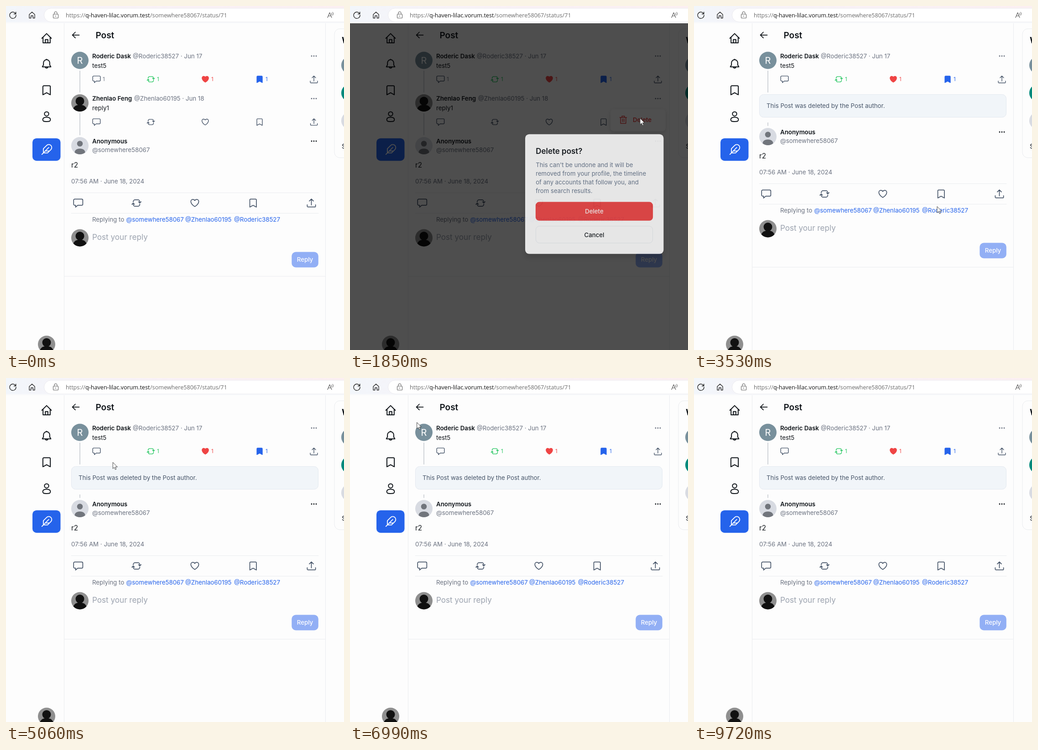
An HTML page that plays this animation: 741x756 px, repeating every 9980 ms.

```html
<!DOCTYPE html>
<html lang="en">
<head>
<meta charset="utf-8">
<title>Delete a post</title>
<style>
  html, body { margin: 0; width: 100%; height: 100%; overflow: hidden; background: #fdfdfd; }
  svg { display: block; font-family: Inter, "Liberation Sans", sans-serif; }
  .url { font-family: "Open Sans", "Noto Sans", sans-serif; }
  #menu > rect { filter: drop-shadow(0 3px 4px #0002); }
  #dialog > rect:first-child { filter: drop-shadow(0 8px 6px #0002); }
</style>
</head>
<body>
<svg id="stage" width="741" height="756" viewBox="0 0 741 756"></svg>
<script>
const LOOP = 9980;
const INK = '#0f1419', GREY = '#6b7280', SLATE = '#475569', BLUE = '#2563eb',
      RED = '#ef4444', GREEN = '#22c55e', LINE = '#eaecef';

// Icon outlines in a 24 x 24 box
const ICONS = {
  reply: 'M4 3h16a2.5 2.5 0 0 1 2.5 2.5v9A2.5 2.5 0 0 1 20 17h-9l-5 4.5V17H4a2.5 2.5 0 0 1-2.5-2.5v-9A2.5 2.5 0 0 1 4 3z',
  repost: 'M4.5 9.5V9a4.2 4.2 0 0 1 4-4.4h7a4.2 4.2 0 0 1 4 4.4v3l3-3m-3 3-3-3M19.5 14.5v.5a4.2 4.2 0 0 1-4 4.4h-7a4.2 4.2 0 0 1-4-4.4v-3l3 3m-3-3-3 3',
  like: 'M21 8.2c0-2.5-2.1-4.5-4.7-4.5-1.9 0-3.6 1.1-4.3 2.7-.7-1.6-2.4-2.7-4.3-2.7C5.1 3.7 3 5.7 3 8.2c0 7.3 9 12 9 12s9-4.7 9-12z',
  save: 'M4.5 5a2 2 0 0 1 2-2h11a2 2 0 0 1 2 2v16.3L12 17.2l-7.5 4.1z',
  share: 'M2.5 16v3.2A1.8 1.8 0 0 0 4.3 21h15.4a1.8 1.8 0 0 0 1.8-1.8V16M7.3 7.5 12 2.8l4.7 4.7M12 3v13.5',
  home: 'M2 12.5 12 2.5l10 10M4.5 10.5V22h15V10.5M9.3 22v-7h5.4v7',
  bell: 'M12 2.5a6.6 6.6 0 0 0-6.6 6.6v4.4L3 17.5h18l-2.4-4V9.1A6.6 6.6 0 0 0 12 2.5zM9.3 18a2.8 2.8 0 0 0 5.4 0M12 1.5v1',
  user: 'M12 1.8a4.5 4.5 0 1 1 0 9 4.5 4.5 0 0 1 0-9zM4 18.5c0-3 3-5 8-5s8 2 8 5c0 3.5-2 4-8 4s-8-.5-8-4z',
  feather: 'M20.2 12.2a6 6 0 0 0-8.5-8.5L5 10.5V19h8.5zM16 8 2 22M17.5 15H9',
  trash: 'M3 6h18M8.5 6V2.5h7V6M5 6v15.5h14V6M10 10v7M14 10v7'
};

const CURSORS = {
  arrow: 'M0 0V13.5L3.2 10.6 5.3 15.5 7.5 14.6 5.4 9.8H9.5z',
  hand: 'M-1.5 1.5C-1.5-.3 1-.3 1 1.5V6.5L6 7.5C7.5 7.9 8 8.8 7.8 10.2L6.8 17.5H-.2C-1.5 15-3 13-4 10.8-4.6 9.5-3.4 8.7-2.6 9.8L-1.5 11zM1 6.5V9M3.3 7V9.3M5.5 7.5V9.6',
  beam: 'M-3.5-7H-1L0-6 1-7H3.5M0-6V6M-3.5 7H-1L0 6 1 7H3.5'
};

// time, x, y, shape until the next point
const PATH = [
  [130, 720, 770, 'arrow'], [650, 700, 430, 'arrow'], [1110, 676, 203, 'hand'],
  [1250, 676, 203, 'arrow'], [1650, 636, 247, 'arrow'], [1870, 636, 247, 'arrow'],
  [2130, 545, 358, 'arrow'], [2400, 537, 431, 'hand'], [2700, 536, 449, 'hand'],
  [2999, 536, 449, 'hand'], [3000, 533, 441, 'arrow'], [3750, 533, 441, 'arrow'],
  [4720, 364, 302, 'arrow'], [5060, 235, 186, 'arrow'], [5330, 28, 105, 'arrow'],
  [5530, 28, 105, 'arrow'], [5750, 15, 20, 'arrow'], [5950, 15, 20, 'arrow'],
  [6150, 105, 95, 'hand'], [6230, 128.5, 109.5, 'hand'], [6570, 150, 130, 'arrow'],
  [7070, 146, 92, 'arrow'], [7400, 146, 92, 'arrow'], [7720, 400, 300, 'beam'],
  [7810, 454, 328, 'beam'], [8340, 484, 345, 'beam'], [8610, 484, 345, 'arrow'],
  [9580, 703, 697, 'arrow'], [9720, 714, 757, 'arrow']
];

// y is the middle of the capitals
function text(x, y, str, { size = 13.3, fill = INK, weight = 400, anchor = 'start', cls = '' } = {}) {
  return `<text class="${cls}" x="${x}" y="${y + size * 0.363}" font-size="${size}" font-weight="${weight}" fill="${fill}" text-anchor="${anchor}">${str}</text>`;
}
function rect(x, y, w, h, r, fill, stroke = 'none') {
  return `<rect x="${x}" y="${y}" width="${w}" height="${h}" rx="${r}" fill="${fill}" stroke="${stroke}"/>`;
}
function circle(x, y, r, fill) {
  return `<circle cx="${x}" cy="${y}" r="${r}" fill="${fill}"/>`;
}
function path(d, stroke, width = 1.4, fill = 'none') {
  return `<path d="${d}" fill="${fill}" stroke="${stroke}" stroke-width="${width}" stroke-linecap="round" stroke-linejoin="round"/>`;
}
function icon(name, x, y, size, color, width = 1.4, fill = 'none') {
  const k = size / 24;
  return `<g transform="translate(${x - size / 2} ${y - size / 2}) scale(${k})">${path(ICONS[name], color, width / k, fill)}</g>`;
}
function group(id, ...parts) {
  return `<g id="${id}">${parts.join('')}</g>`;
}
function dots(y, color) {
  return [-5, 0, 5].map(d => circle(675 + d, y, 1.45, color)).join('');
}
function actions(x, y, step, size, width) {
  return ['reply', 'repost', 'like', 'save', 'share']
    .map((name, i) => icon(name, x + step * i, y, size, SLATE, width)).join('');
}
function silhouette(x, y) {
  return `<g transform="translate(${x} ${y})">${circle(0, 0, 19, '#8f8f8f')}${circle(0, -4, 9.5, '#111')}
    <path d="M-14.5 12.3Q-11 4 0 4T14.5 12.3A19 19 0 0 1-14.5 12.3z" fill="#111"/></g>`;
}
function blankUser(x, y) {
  return `<g transform="translate(${x} ${y})">${circle(0, 0, 19, '#d8dbe2')}${circle(0, -4.5, 6.3, '#71757c')}
    <path d="M-11.5 15.1C-11.5 9-6 6.5 0 6.5S11.5 9 11.5 15.1A19 19 0 0 1-11.5 15.1z" fill="#71757c"/></g>`;
}
function postHead(y, name, handle, handleX, body) {
  return text(189, y, name, { weight: 600 }) + text(handleX, y, handle, { fill: GREY }) +
    text(189, y + 21, body) + dots(y, GREY);
}

const count = (x, fill) => text(x, 161, '1', { size: 11.4, fill });
const url = (x, str, fill) => text(x, 20, str, { size: 12.6, fill, cls: 'url' });

const toolbar = group('toolbar',
  `<defs><linearGradient id="bar"><stop stop-color="#f2f6fb"/><stop offset=".3" stop-color="#f8f2f7"/><stop offset="1" stop-color="#fbeff2"/></linearGradient></defs>`,
  rect(0, 0, 741, 38, 0, 'url(#bar)'), rect(0, 35, 741, 3, 0, '#f8f9fb'),
  rect(83.5, 5, 680, 30, 15, '#fff', '#ebeaef'),
  group('reload', path('M21.4 17.4A7 7 0 1 0 22 20M21.7 13.2v4.3h-4.3', '#222', 1.3)),
  group('stop', rect(-6, 6, 40, 28.5, 4, '#e2e3e9'), path('M10 15l10.500 10.500M20.500 15 10 25.500'.replace(/00/g, ''), '#222', 1.3)),
  path('M51 18.7 57 13.2l6 5.5V26.500H59.2V21.5H54.8V26.5H51z', '#222', 1.3),
  path('M104.5 18h9a1 1 0 0 1 1 1v6.5a1 1 0 0 1-1 1h-9a1 1 0 0 1-1-1V19a1 1 0 0 1 1-1zM106 18v-2.5a3 3 0 0 1 6 0V18', '#666', 1.1),
  circle(109, 22.3, 1, '#666'),
  url(131, 'https://', '#6b6b6b'),
  url(174, 'q-haven-lilac.vorum.test', '#111'),
  url(316, '/somewhere58067/status/71', '#6b6b6b'),
  path('M705 25.5 709.5 14.5 714 25.5M706.6 21.8H712.4', '#555', 1.1),
  path('M713.5 15.5q1.5 1.8 0 4M716 13.5q3 3.5 0 7', '#555', 1));

const shell = [
  icon('home', 89, 70.5, 25, INK, 2), icon('bell', 89, 128, 25, INK, 2),
  icon('save', 89, 185, 26, INK, 2), icon('user', 89, 243, 25, INK, 2),
  rect(58, 290.7, 61.5, 49.5, 9, BLUE), icon('feather', 89.5, 315.3, 26, '#fff', 1.8),
  silhouette(89, 743.5),
  path('M127.5 38V756M700.5 38V756', LINE, 1),
  path('M152 57.5 145.5 63.8 152 70.2M146 63.8H160.5', INK, 1.7),
  text(196.5, 64, 'Post', { size: 19, weight: 600 }),
  rect(720, 50, 90, 283.5, 12, '#fdfdfd', LINE),
  text(736, 75, 'Who to follow', { size: 19, weight: 700 }),
  circle(754, 130, 19, '#78909c'), circle(754, 191, 19, '#00897b'), circle(754, 252, 19, '#d8dbe2'),
  text(736, 308, 'Show more')
].join('');

const firstPost = [
  circle(162, 119.5, 19, '#78909c'),
  text(162, 119.8, 'R', { size: 20, fill: '#fff', anchor: 'middle' }),
  postHead(110, 'Roderic Dask', '@Roderic38527 · Jun 17', 278, 'test5'),
  rect(161, 142, 2, 48, 0, '#d1d4d9'),
  icon('reply', 198.5, 161, 19, SLATE),
  icon('repost', 317.5, 161, 19, GREEN), count(331, GREEN),
  icon('like', 437, 161, 19, RED, 1.4, RED), count(450, RED),
  icon('save', 556, 161, 19, BLUE, 1.4, BLUE), count(569, BLUE),
  icon('share', 675, 161.5, 20, SLATE)
].join('');

const secondPost = group('second',
  count(212, GREY),
  silhouette(162, 213),
  postHead(203.5, 'Zhenlao Feng', '@Zhenlao60195 · Jun 18', 281, 'reply1'),
  rect(161, 236, 2, 48, 0, '#d1d4d9'),
  actions(198.3, 255, 119.2, 19, 1.4));

const notice = group('notice',
  rect(143.5, 194.5, 541, 50, 9, '#f1f5f9', '#e4e9f0'),
  text(159, 219, 'This Post was deleted by the Post author.', { fill: SLATE }),
  rect(161, 256, 2, 7.5, 0, '#d1d4d9'));

const detail = group('detail',
  blankUser(162, 307),
  text(189, 297, 'Anonymous', { weight: 600 }), text(189, 316, '@somewhere58067', { fill: GREY }),
  dots(297, INK),
  text(143, 349, 'r2', { size: 15.2 }),
  text(143, 385, '07:56 AM · June 18, 2024', { fill: GREY }),
  path('M143 410.5H685M143 455.5H685M128 594H700', LINE, 1),
  actions(158.3, 433, 127.8, 23, 1.7),
  text(189, 469, 'Replying to', { fill: GREY }),
  text(263.5, 469, '@somewhere58067', { fill: BLUE }),
  text(393, 469, '@Zhenlao60195', { fill: BLUE }),
  text(500, 469, '@Roderic38527', { fill: BLUE }),
  silhouette(162, 509.5),
  text(189, 508, 'Post your reply', { size: 17.1, fill: '#9ca3af' }),
  rect(626.3, 540.5, 58.5, 34, 9, '#92aff5'),
  text(655.5, 557.5, 'Reply', { fill: '#fff', weight: 500, anchor: 'middle' }));

const menu = group('menu',
  rect(571, 226.5, 121, 49, 8, '#fff'),
  icon('trash', 599, 250, 20, RED, 1.5),
  text(620, 250, 'Delete', { fill: RED, weight: 600 }));

const dialog = group('dialog',
  rect(383, 280, 305.5, 265, 9, '#fff'),
  text(406.3, 317.3, 'Delete post?', { size: 17.1, weight: 600 }),
  ["This can't be undone and it will be", 'removed from your profile, the timeline',
   'of any accounts that follow you, and', 'from search results.']
    .map((s, i) => text(406.3, 348 + 19 * i, s, { fill: '#64748b' })).join(''),
  group('confirm', rect(406, 430, 259, 41.5, 8, 'inherit')),
  text(535.5, 451, 'Delete', { fill: '#fff', weight: 500, anchor: 'middle' }),
  rect(406.5, 483.5, 258, 37.5, 8, '#fff', '#e8ecf1'),
  text(535.5, 502.7, 'Cancel', { weight: 500, anchor: 'middle' }));

document.getElementById('stage').innerHTML =
  rect(0, 0, 741, 756, 0, '#fdfdfd') +
  group('page', shell, firstPost, secondPost, notice, detail, menu) +
  group('loading', text(61.3, 49.5, 'Loading...', { size: 15.2, anchor: 'end' })) +
  group('shade', rect(0, 38, 741, 718, 0, '#000')) +
  dialog + toolbar +
  group('cursor', path('', '#333', 0.9));

const el = id => document.getElementById(id);
const clamp = v => Math.max(0, Math.min(1, v));
const show = (id, on) => el(id).setAttribute('display', on ? 'inline' : 'none');
const within = (t, a, b) => t >= a && t < b;

function drawCursor(t) {
  const i = PATH.findIndex(p => t < p[0]);
  show('cursor', i > 0);
  if (i < 1) return;
  const [t0, x0, y0, shape] = PATH[i - 1], [t1, x1, y1] = PATH[i];
  const u = (t - t0) / (t1 - t0);
  const g = el('cursor'), p = g.firstChild;
  g.setAttribute('transform', `translate(${x0 + (x1 - x0) * u} ${y0 + (y1 - y0) * u})`);
  p.setAttribute('d', CURSORS[shape]);
  p.setAttribute('fill', shape === 'beam' ? 'none' : '#fff');
}

function draw(t) {
  const deleted = t >= 3130;
  show('second', !deleted);
  show('notice', deleted);
  el('detail').setAttribute('transform', `translate(0 ${deleted ? -20 : 0})`);
  show('menu', within(t, 1250, 3130));

  // Dialog zooms and slides in, then fades out
  const open = t < 3000 ? 1 - (1 - clamp((t - 1754) / 200)) ** 3 : clamp((3130 - t) / 200);
  const k = 0.95 + 0.05 * open;
  el('shade').setAttribute('opacity', 0.8 * open);
  el('dialog').setAttribute('opacity', open);
  el('dialog').setAttribute('transform',
    `translate(535.7 ${412.5 + 5.3 * (1 - open)}) scale(${k}) translate(-535.7 -412.5)`);
  el('confirm').setAttribute('fill', t > 2400 ? '#f15757' : RED);

  const busy = within(t, 5850, 6510);
  show('stop', busy);
  show('reload', !busy);
  show('loading', within(t, 5950, 6510));
  show('page', !within(t, 5950, 6570));
  drawCursor(t);
}

const start = performance.now();
function tick() {
  draw((performance.now() - start) % LOOP);
  requestAnimationFrame(tick);
}
tick();
</script>
</body>
</html>
```
